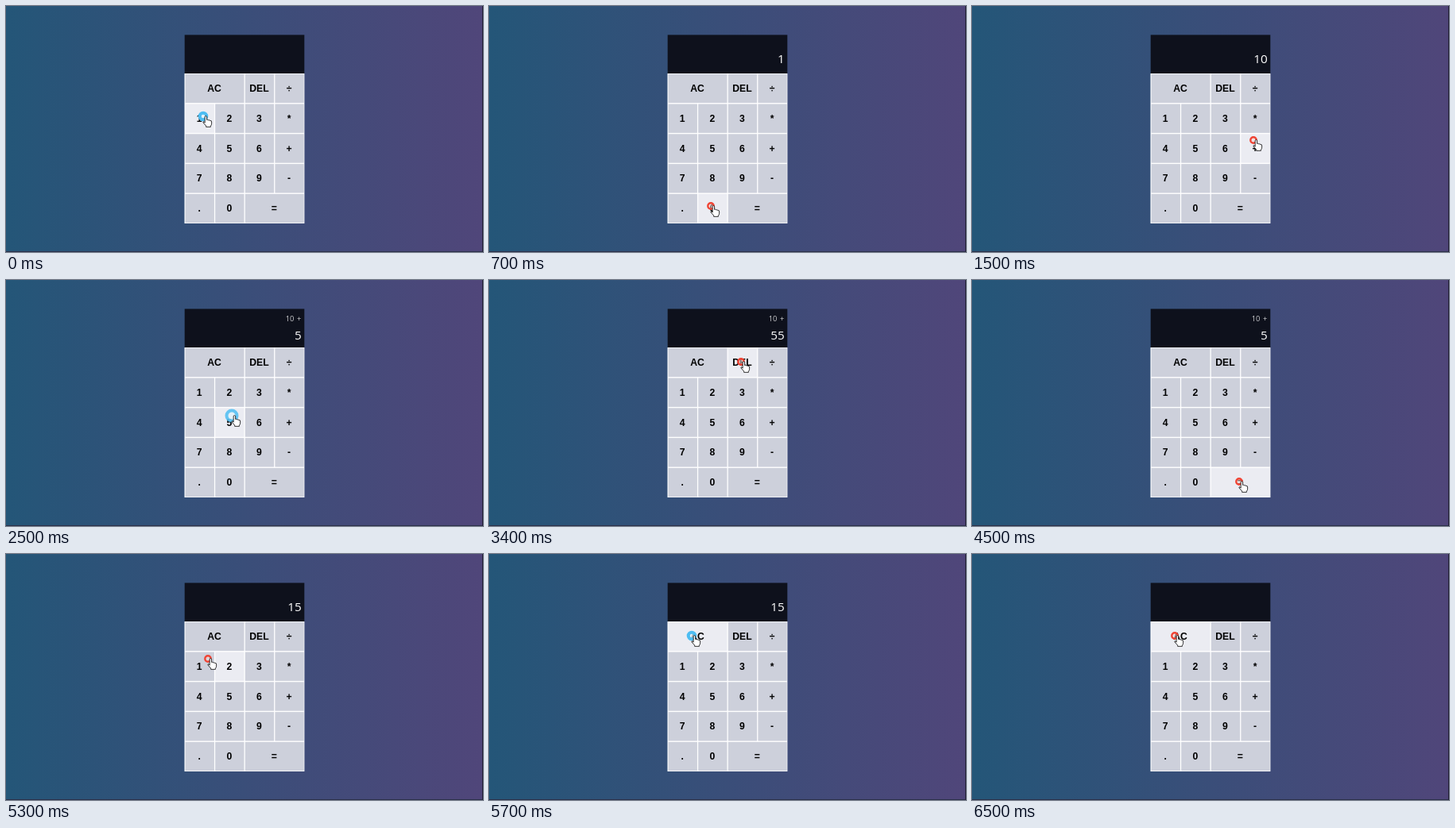
An HTML page that plays this animation: 600 by 310 pixels, repeating every 6.7 s.

```html
<!DOCTYPE html>
<html lang="en">
<head>
<meta charset="utf-8">
<title>Calculator</title>
<style>
  html, body { margin: 0; width: 100%; height: 100%; overflow: hidden; }
  body { background: linear-gradient(to right, #245678, #50467a); }
  svg { display: block; }
  .key rect { fill: #cdd0db; }
  .key.hover rect { fill: #ebecf2; }
  .key text { font: bold 12.2px "Liberation Sans", Arial, sans-serif; text-anchor: middle; }
  .out { font-family: "Open Sans", "Noto Sans", sans-serif; font-weight: 500; fill: #fff; text-anchor: end; }
  #prev { font-size: 9.3px; word-spacing: 1.2px; fill-opacity: .8; }
  #curr { font-size: 15.3px; }
  #ring { fill: rgba(250, 215, 210, .5); stroke: #f04434; stroke-width: 2.4; }
  #ring.click { fill: rgba(225, 243, 252, .7); stroke: #4dbdf2; stroke-width: 4; }
</style>
</head>
<body>
<svg width="600" height="310">
  <path d="M0 309.5H600" stroke="#2b3049"/>
  <path d="M599.5 0V310" stroke="#201d33"/>
  <rect x="224.7" y="36.4" width="150.6" height="49" fill="#0e111c"/>
  <text id="prev" class="out" x="371.3"></text>
  <text id="curr" class="out" x="371.8"></text>
  <rect x="224.5" y="85" width="150.9" height="189" fill="#fff"/>
  <g id="keys"></g>
  <g id="pointer">
    <circle id="ring"/>
    <path transform="translate(3.4 .2) scale(.94)" fill="#fff" stroke="#111" stroke-width=".9" stroke-linejoin="round"
      d="M-1.3 8.5V.7Q-1.3-.6 0-.6T1.3.7V4.5Q2.6 3.9 3.6 5Q5 4.5 5.9 5.7Q7.7 5.2 7.7 7.2V9.5Q7.7 11.5 6.4 12.7V14H.3V12.6L-3.6 8.3Q-4.1 6.8-2.7 6.9Z"/>
  </g>
</svg>
<script>
const LOOP = 6700, STEP = 100, MOVE = 400, PAUSE = 200, CLICK = 300;
const COL = 37.6, ROW = 37.8, LEFT = 225, TOP = 85;
const $ = id => document.getElementById(id);

function add(parent, tag, attrs) {
  const el = document.createElementNS('http://www.w3.org/2000/svg', tag);
  for (const k in attrs) el.setAttribute(k, attrs[k]);
  return parent.appendChild(el);
}

const keys = [];
const rows = ['AC DEL ÷', '1 2 3 *', '4 5 6 +', '7 8 9 -', '. 0 ='];
rows.forEach((line, r) => {
  let x = LEFT;
  const y = TOP + r * ROW;
  for (const label of line.split(' ')) {
    const w = /AC|=/.test(label) ? 2 * COL : COL;
    const el = add($('keys'), 'g', { class: 'key' });
    add(el, 'rect', { x: x + .6, y: y + .7, width: w - 1.3, height: ROW - 1.4 });
    add(el, 'text', { x: x + w / 2 - .6, y: y + ROW / 2 + 4.1 }).textContent = label;
    keys.push({ el, x, y, w });
    x += w;
  }
});

// pointer stops; a key is pressed shortly after arrival, null is only passed through
const stops = [
  { at: -200, x: 248, y: 139, key: '1' },
  { at: 600, x: 279, y: 252, key: '0' },
  { at: 1400, x: 354, y: 169, key: '+' },
  { at: 2200, x: 284, y: 171, key: '5' },
  { at: 2600, x: 284, y: 171, key: '5' },
  { at: 3300, x: 317, y: 103, key: 'DEL' },
  { at: 4400, x: 336, y: 254, key: '=' },
  { at: 5300, x: 254, y: 132, key: null },
  { at: 5500, x: 255, y: 103, key: 'AC' }
];
const presses = stops.filter(s => s.key).map(s => ({ at: s.at + PAUSE, key: s.key }));

function pointerAt(t) {
  const i = stops.findLastIndex(s => s.at <= t);
  const a = stops[i], b = stops[i + 1] || a;
  const from = Math.max(a.at, b.at - MOVE);
  const u = Math.min(1, Math.max(0, (t - from) / (b.at - from || 1)));
  const e = u * u * (3 - 2 * u);
  return [a.x + (b.x - a.x) * e, a.y + (b.y - a.y) * e];
}

function press({ prev, curr }, key) {
  if (key === 'AC') return { prev: '', curr: '' };
  if (key === 'DEL') return { prev, curr: curr.slice(0, -1) };
  if (key === '+') return { prev: curr + ' +', curr: '' };
  if (key === '=') return { prev: '', curr: String(parseFloat(prev) + Number(curr)) };
  return { prev, curr: curr + key };
}

function draw(t) {
  const [x, y] = pointerAt(t);
  $('pointer').setAttribute('transform', `translate(${x} ${y})`);

  // hover trails the pointer by one step
  const [hx, hy] = pointerAt(Math.max(0, t - STEP));
  for (const k of keys) {
    const inside = hx + 3 >= k.x && hx + 3 < k.x + k.w && hy >= k.y && hy < k.y + ROW;
    k.el.classList.toggle('hover', inside);
  }

  const age = t - presses.findLast(p => p.at <= t).at;
  const clicking = age < CLICK;
  $('ring').classList.toggle('click', clicking);
  $('ring').setAttribute('r', clicking ? 4.3 + age * .022 : 3.7);
  $('ring').setAttribute('stroke-opacity', clicking ? 1 - age * .0015 : 1);

  // a key takes effect one step after it goes down
  const { prev, curr } = presses
    .filter(p => p.at + STEP <= t)
    .reduce((state, p) => press(state, p.key), { prev: '', curr: '' });
  $('prev').textContent = prev;
  $('curr').textContent = curr;
  // the two lines share the spare height of the display
  $('prev').setAttribute('y', curr ? 51.5 : 56.5);
  $('curr').setAttribute('y', prev ? 75 : 72);
}

const start = performance.now();
function frame() {
  const t = (performance.now() - start) % LOOP;
  draw(Math.floor(t / STEP) * STEP);
  requestAnimationFrame(frame);
}
frame();
</script>
</body>
</html>
```
